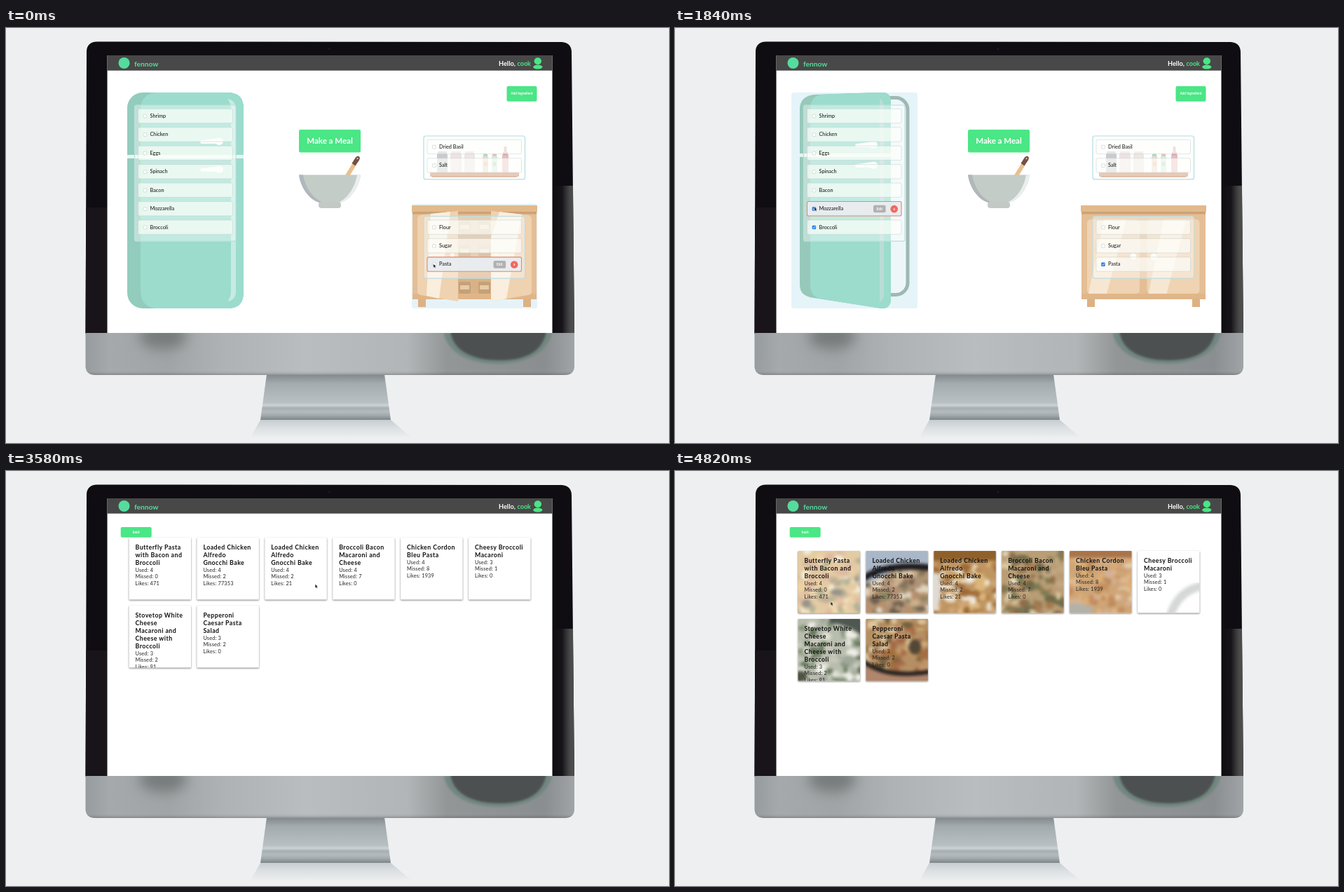
An HTML page that plays this animation: 946x592 px, repeating every 4.84 s.

```html
<!DOCTYPE html>
<html lang="en">
<head>
<meta charset="utf-8">
<title>Kitchen planner</title>
<style>
html, body { margin: 0; width: 100%; height: 100%; overflow: hidden; background: #edeff1; }
svg { display: block; width: 946px; height: 592px; font-family: Lato, "Open Sans", sans-serif; }
filter { color-interpolation-filters: sRGB; }
.mix { isolation: isolate; }
.mix > g { mix-blend-mode: plus-lighter; }
</style>
</head>
<body>
<svg id="stage" viewBox="0 0 946 592" xmlns="http://www.w3.org/2000/svg"></svg>
<script>
const LOOP = 4840;
const GREEN = '#4be685';

// Markup helpers
const attrs = o => Object.entries(o).map(([k, v]) => ` ${k}="${v}"`).join('');
const box = (x, y, w, h, fill, r = 0, o = {}) =>
  `<rect x="${x}" y="${y}" width="${w}" height="${h}" fill="${fill}" rx="${r}"${attrs(o)}/>`;
const path = (d, fill, o = {}) => `<path d="${d}" fill="${fill}"${attrs(o)}/>`;
const dot = (x, y, rx, fill, ry = rx, o = {}) =>
  `<ellipse cx="${x}" cy="${y}" rx="${rx}" ry="${ry}" fill="${fill}"${attrs(o)}/>`;
const text = (x, y, s, size, fill = '#222', o = {}) =>
  `<text x="${x}" y="${y}" font-size="${size}" fill="${fill}"${attrs(o)}>${s}</text>`;
const group = (id, inner, o = {}) => `<g id="${id}"${attrs(o)}>${inner}</g>`;
const grad = (id, stops, down) =>
  `<linearGradient id="${id}" x2="${down ? 0 : 1}" y2="${down ? 1 : 0}">` +
  stops.map(([at, c, a = 1]) => `<stop offset="${at}" stop-color="${c}" stop-opacity="${a}"/>`).join('') +
  '</linearGradient>';
const bold = { 'font-weight': 700 };
const mid = { 'text-anchor': 'middle' };

function seeded(seed) {
  return () => (seed = (seed * 16807) % 2147483647) / 2147483647;
}

const defs = '<defs>' +
  grad('chin', [[0, '#969b9d'], [.05, '#a5a9ab'], [.17, '#a0a4a6'], [.28, '#aeb2b4'], [.45, '#b9bdbf'],
    [.66, '#b1b5b7'], [.74, '#929697'], [.94, '#8a8e90'], [1, '#a0a4a6']]) +
  grad('chinShade', [[0, '#fff', 0], [.85, '#fff', 0], [.95, '#555', .1], [1, '#444', .35]], true) +
  grad('neck', [[0, '#80888b'], [.2, '#a3abae'], [.62, '#b8c0c3'], [.68, '#cdd3d5'], [.74, '#a7aeb1'],
    [.82, '#b4bbbe'], [.9, '#a3aaad'], [1, '#7d8588']], true) +
  grad('foot', [[0, '#c6cdd0'], [.5, '#dde1e3'], [1, '#eceeef']], true) +
  grad('sheen', [[0, '#555', 0], [.45, '#555', .1], [.8, '#4f4f4f', .9], [1, '#505050', 1]]) +
  '<filter id="soft"><feGaussianBlur stdDeviation="2"/></filter>' +
  '<filter id="edge"><feGaussianBlur stdDeviation="1.6"/></filter>' +
  '<filter id="haze" x="-50%" y="-50%" width="200%" height="200%"><feGaussianBlur stdDeviation="9"/></filter>' +
  '<filter id="drop" x="-10%" y="-10%" width="120%" height="125%">' +
  '<feDropShadow dx="0" dy="1" stdDeviation=".9" flood-opacity=".5"/></filter>' +
  '<clipPath id="chinClip"><path d="M113.5 435H811V482Q811 495 797 495H128Q113.5 495 113.5 482Z"/></clipPath>' +
  '<clipPath id="cardClip"><rect width="88.5" height="88.5" rx="1"/></clipPath>' +
  '</defs>';

function monitor() {
  return path('M349 584L363 559H549L578 584Z', 'url(#foot)') +
    path('M372 494H540L549 559H363Z', 'url(#neck)') +
    path('M115 34Q115 20 130 19.5L793 20Q806.5 21 807 34L811 436H113.5Z', '#0f0d12') +
    path('M114.3 256H145V436H113.5Z', '#191419') +
    path('M779 225H809L811 436H779Z', 'url(#sheen)') +
    dot(461, 30, 1.4, '#1c1b22') +
    `<g clip-path="url(#chinClip)">${box(113, 435, 698, 60, 'url(#chin)')}` +
    dot(224, 440, 34, '#767b7c', 18, { filter: 'url(#haze)' }) +
    path('M625 435C630 464 662 479 702 479S772 464 779 435Z', '#71877f', { filter: 'url(#edge)' }) +
    path('M634 432C638 462 667 474 704 474S766 462 771 432Z', '#4d5051', { filter: 'url(#edge)' }) +
    box(113, 435, 698, 60, 'url(#chinShade)') + '</g>' +
    box(144.5, 39, 635, 396, '#fff');
}

function header() {
  return box(144.5, 39, 635, 21.7, '#484848') +
    dot(168.5, 50, 8, '#55dc9c') +
    text(183, 54.7, 'fennow', 10.2, '#55dc9c', bold) +
    text(703, 54.4, 'Hello,', 9.2, '#fff', bold) +
    text(729.5, 54.4, 'cook', 9, GREEN, bold) +
    dot(758.8, 47.3, 5.2, GREEN, 5) + dot(758.8, 55.6, 6.6, GREEN, 3);
}

const handle = (x, y, w) =>
  path(`M${x} ${y + 5}Q${x} ${y + 3} ${x + 4} ${y + 3}L${x + w - 6} ${y}Q${x + w} ${y} ${x + w} ${y + 4}` +
    `Q${x + w} ${y + 10} ${x + w - 7} ${y + 10}L${x + w - 11} ${y + 8}H${x + 3}Q${x} ${y + 8} ${x} ${y + 5}Z`, '#fafdfc');

function fridgeShut() {
  return box(173, 92, 166, 308, '#92ccbc', 22) +
    path('M213 92H317Q339 92 339 114V378Q339 400 317 400H213Q192 397 192 375V117Q192 95 213 92Z', '#9bdccd') +
    path('M316 101Q328 103 328 116V376Q328 388 316 390Q321 384 321 374V116Q321 107 316 101Z', '#c6ebe2') +
    box(173, 181, 166, 5, '#e6f7f2') + handle(277, 157, 33) + handle(277, 197, 33);
}

function fridgeOpen() {
  return box(166, 92, 180, 308, '#e5f4f9', 4) +
    box(290, 99.5, 42, 281, '#edf7fa', 17, { stroke: '#9fb9b2', 'stroke-width': 5 }) +
    path('M199 95L288 92H298Q308 93 308 106V386Q308 399 297 400Q292 400 288 399L198 385Q178 383 178 366V116Q178 97 199 95Z', '#96c9ba') +
    path('M207 95L288 92H298Q308 93 308 106V386Q308 399 297 400Q292 400 288 399L206 386Q193 382 193 366V116Q193 99 207 95Z', '#9bdccd') +
    path('M292 101Q298 104 298 114V380Q298 388 292 391Z', '#b9dcd6') +
    path('M178 179H308V184H178Z', '#e3f5f1') + handle(257, 162, 32) + handle(257, 191, 32);
}

const cupboard = inner =>
  box(588, 386, 11, 12, '#dcb183') + box(738, 386, 11, 12, '#dcb183') +
  box(580, 260, 177, 127, '#e4be95', 2) + inner +
  box(580, 379, 177, 8, '#e0b688') + box(579, 253, 179, 9.5, '#e2b98b', 1) +
  box(580, 262, 177, 3.5, '#cda276');

function cabinetShut() {
  const door = (x, knob) => box(x, 273, 75, 106, '#efd3b2', 5) +
    path(`M${x + 24} 273H${x + 56}L${x + 28} 379H${x + 2}Z`, '#f7e7d2') + dot(knob, 326, 4.5, '#fffaf2');
  return cupboard(door(588, 654) + door(673.5, 683));
}

function cabinetOpen() {
  let jars = '';
  for (const x of [646, 674]) {
    for (const y of [276, 310, 362]) jars += box(x, y, 17, 17, '#c6a077', 2) + box(x + 2, y + 5, 13, 6, '#e7cba8');
  }
  return box(579, 251, 179, 149, '#e5f3f8', 3) +
    cupboard(box(588, 268, 161, 111, '#d8b187', 4) + jars + box(588, 326, 161, 4, '#e4bd92')) +
    path('M587 272Q587 268 591 267L645 261V390L592 381Q587 380 587 376Z', '#efd2b0') +
    path('M606 265L634 262L618 386L600 382Z', '#faeede') +
    path('M692 261L745 267Q750 268 750 272V376Q750 380 745 381L692 390Z', '#efd2b0') +
    path('M704 262L736 266L714 386L692 390V300Z', '#faeede') +
    dot(637, 324, 3, '#fff7ec') + dot(699, 324, 3, '#fff7ec');
}

function spiceShelf() {
  const jar = (x, w, top, c, cap) => box(x, top, w, 206 - top, c, 1.5) + box(x + 1, top - 3, w - 2, 4, cap, 1);
  return box(605, 206, 127, 6, '#d9a888') + box(608, 211.5, 121, 1.5, '#c59070') +
    jar(615, 15, 179, '#a7abae', '#8a8d90') + jar(634, 16, 179, '#e6cfd0', '#b9b4b6') +
    jar(654, 15, 179, '#e5d5d2', '#c9b5b2') + jar(680, 8, 182, '#dfc3ae', '#7cc4a0') +
    jar(693, 8, 182, '#bfe0c6', '#da9c8f') + jar(708, 9, 180, '#d98f92', '#a5565f') + box(710.5, 169, 4, 10, '#b7737a', 1) +
    box(682, 191, 5, 6, '#e78a62') + box(694.5, 191, 5, 6, '#7bbd8d');
}

function bowl() {
  return path('M484 210L495 192L500 195L489 213Z', '#e9bf8d') +
    path('M493.5 193L499 184.5Q502 181.5 504.5 184Q505.5 186 504 188.5L498.5 196.5Z', '#735143') +
    dot(501.5, 186.3, 1, '#e8dcd4') +
    path('M418 209.5H506C504 226 492 245 477 249H447C432 245 420 226 418 209.5Z', '#c4ccc7') +
    path('M418 209.5H424C427 227 438 245 454 249H447C432 245 420 226 418 209.5Z', '#b1b7bb') +
    path('M506 209.5H501C498 227 488 243 474 249H477C492 245 504 226 506 209.5Z', '#ebeeef') +
    box(446, 248, 32, 9, '#c3c9c6', 4);
}

// Ingredient lists: id, x, width, first row centre, names
const lists = [
  ['f', 188.5, 134.5, 125.5, ['Shrimp', 'Chicken', 'Eggs', 'Spinach', 'Bacon', 'Mozzarella', 'Broccoli']],
  ['s', 601, 134.5, 169.5, ['Dried Basil', 'Salt']],
  ['c', 601, 134.5, 284.2, ['Flour', 'Sugar', 'Pasta']]
];
const PITCH = 26.45;
const rows = [];

function list([id, x, w, first, names]) {
  const h = names.length * PITCH + 9;
  return box(x - 5, first - 15.5, w + 10, h, 'rgba(255,255,255,.38)', 3,
    { stroke: id === 's' ? '#b3dde0' : '#bfdde0', 'stroke-width': 1.2 }) +
    names.map((name, i) => {
      const y = first + i * PITCH, key = id + i;
      rows.push({ key, x, w, y });
      return box(x, y - 10.2, w, 20.4, 'rgba(253,255,250,.66)', 2, { stroke: 'rgba(190,205,205,.55)', 'stroke-width': .9 }) +
        group('hot-' + key,
          box(x, y - 10.2, w, 20.4, 'rgba(233,236,239,.93)', 2, { stroke: '#e28a70', 'stroke-width': 1.1 }) +
          box(x + 94.5, y - 5, 17.6, 10.6, '#b1b1b1', 2) +
          text(x + 103.3, y + 2, 'Edit', 4.8, '#fff', { ...mid, ...bold }) +
          dot(x + 124.2, y + .4, 5.3, '#f1695d') +
          text(x + 124.2, y + 2, 'x', 4.8, '#fff', { ...mid, ...bold })) +
        box(x + 7.5, y - 2.2, 4.8, 4.8, '#fff', .8, { stroke: '#c3c9c9', 'stroke-width': .6 }) +
        group('tick-' + key, box(x + 7.2, y - 2.5, 5.4, 5.4, '#2f7ff0', 1) +
          path(`M${x + 8.4} ${y + .3}l1.2 1.2l2-2.8`, 'none', { stroke: '#fff', 'stroke-width': .8 })) +
        text(x + 17, y + 2.3, name, 7.3, '#222', { 'font-weight': 500 });
    }).join('');
}

const button = (x, y, w, h, label, size) =>
  box(x, y, w, h, GREEN, 2) + text(x + w / 2, y + h / 2 + size * .35, label, size, '#fff', { ...mid, ...bold });

function home() {
  return group('fridge', group('fridge-shut', fridgeShut()) + group('fridge-open', fridgeOpen()), { class: 'mix' }) +
    group('cabinet', group('cabinet-shut', cabinetShut()) + group('cabinet-open', cabinetOpen()), { class: 'mix' }) +
    spiceShelf() + lists.map(list).join('') + bowl() +
    button(418, 145, 88, 32.5, 'Make a Meal', 11.5) +
    button(714.5, 83, 43, 21.7, 'Add Ingredient', 4.7);
}

// Recipe cards: title lines, used, missed, likes, load time, photo tones
const meals = [
  ['Butterfly Pasta|with Bacon and|Broccoli', 4, 0, 471, 3660, '#c99a50 #e0b564 #ecd9ac #8a6632 #6d6a35 #c07a45 #d9a94f'],
  ['Loaded Chicken|Alfredo|Gnocchi Bake', 4, 2, 77353, 3680, '#b09376 #cdb08d #e0d3bd #86705c #8b8560 #b98f6c #6f5f4e'],
  ['Loaded Chicken|Alfredo|Gnocchi Bake', 4, 2, 21, 4000, '#bf9561 #dcb67a #ebe0cd #9d6a35 #cfa675 #eee6da #b5834a'],
  ['Broccoli Bacon|Macaroni and|Cheese', 4, 7, 0, 3720, '#b89d75 #dcc9a0 #6f6a48 #a67a50 #e6dabd #7c7a52 #c3a682 #8f6c4a'],
  ['Chicken Cordon|Bleu Pasta', 4, 8, 1939, 4200, '#cfa577 #deb98c #d5b296 #b88a5a #e3cfb2 #c58d5e #dcae74'],
  ['Cheesy Broccoli|Macaroni', 3, 1, 0, 4700, ''],
  ['Stovetop White|Cheese|Macaroni and|Cheese with|Broccoli', 3, 2, 91, 3700, '#b9bdae #dfe1d5 #87967c #a0a89b #eeeee6 #66785c #c9cabd'],
  ['Pepperoni|Caesar Pasta|Salad', 3, 2, 0, 3760, '#b58f63 #cfab78 #a0713f #75603f #ddc59c #a56a47 #c2966a']
];

// Marks that set single photos apart
const accents = {
  0: dot(55, 59, 9, '#38301f', 5) + dot(12, 75, 7, '#38301f', 6) + dot(84, 40, 4, '#4b4026', 5),
  1: path('M-4 -4H93V20Q60 14 38 29Q18 40 -4 48Z', '#a9b7c8') +
    path('M-4 40Q26 17 93 24', 'none', { stroke: '#1d1b1e', 'stroke-width': 9 }),
  2: box(-4, -4, 97, 18, '#8f602c') + dot(2, 56, 8, '#dfdbd3', 26),
  4: box(-4, -4, 97, 14, '#a9744a') + dot(6, 84, 28, '#b3b1a9', 9),
  6: path('M45 -4H93V26Q72 7 45 6Z', '#4f5751') + dot(3, 82, 10, '#4e5543', 8),
  7: dot(70, 40, 9, '#544735', 11) + path('M-4 64Q30 86 92 74V93H-4Z', '#b0866c') +
    path('M-4 60Q30 86 92 75', 'none', { stroke: '#201c1b', 'stroke-width': 6 })
};

function photo(i, tones) {
  if (!tones) {
    return path('M94 50Q58 55 46 94', 'none', { stroke: '#d5d8d7', 'stroke-width': 12, filter: 'url(#soft)' });
  }
  const rnd = seeded(211 + i * 977), c = tones.split(' ');
  let s = box(-8, -8, 105, 105, c[0]);
  for (let n = 0; n < 110; n++) {
    s += dot((rnd() * 92).toFixed(1), (rnd() * 92).toFixed(1), (3 + rnd() * 6).toFixed(1),
      c[Math.floor(rnd() * c.length)], (3 + rnd() * 4).toFixed(1));
  }
  return `<g filter="url(#soft)">${s}${accents[i] || ''}</g>`;
}

const cardAt = i => [175.5 + (i % 6) * 96.9, 95 + Math.floor(i / 6) * 97];

function card([title, used, missed, likes, , tones], i) {
  const [x, y] = cardAt(i), lines = title.split('|');
  const facts = [`Used: ${used}`, `Missed: ${missed}`, `Likes: ${likes}`];
  const below = 16 + lines.length * 11;
  return `<g transform="translate(${x} ${y})">` + box(0, 0, 88.5, 88.5, '#fff', 1, { filter: 'url(#drop)' }) +
    '<g clip-path="url(#cardClip)">' + group('photo-' + i, photo(i, tones)) +
    group('veil-' + i, box(0, 0, 88.5, 88.5, '#fff', 0, { 'fill-opacity': .48 })) +
    lines.map((s, n) => text(9, 16.8 + n * 11, s, 8.8, '#111', { ...bold, 'letter-spacing': .45 })).join('') +
    facts.map((s, n) => text(9, below + n * 9.3, s, 7.3, '#222', { 'letter-spacing': .2 })).join('') +
    '</g></g>';
}

const results = () => group('cards', meals.map(card).join('')) + button(163.7, 80, 44, 14.8, 'back', 4.8);

const stage = document.getElementById('stage');
stage.innerHTML = defs + box(0, 0, 946, 592, '#edeff1') + monitor() + header() +
  group('home', home()) + group('results', results()) +
  group('cursor', path('M0 0L.2 5.2L1.4 4.2L2.3 6L3.3 5.5L2.5 3.8L4 3.6Z', '#111', { stroke: '#fff', 'stroke-width': .4 }));

const el = {};
stage.querySelectorAll('[id]').forEach(n => el[n.id] = n);

// Pointer stops: time, x, y
const stops = [[0, 609.7, 336.5], [300, 609.7, 336.5], [760, 197.3, 285.5], [1350, 197.3, 285.5],
  [1650, 198.8, 255.5], [2000, 198.8, 255.5], [2250, 198.8, 230], [2850, 198.8, 230], [3350, 441, 161.5],
  [4100, 441, 161.5], [4560, 222, 186.5], [LOOP, 222, 186.5]];
const ticks = { c2: 180, f6: 1120, f5: 1760, f4: 2400 };
const FADE = 220, PAGE = 3460, SETTLE = 3640;

const clamp = v => Math.max(0, Math.min(1, v));
const show = (node, on) => node.setAttribute('visibility', on ? 'inherit' : 'hidden');

function pointer(t) {
  const i = Math.max(1, stops.findIndex(s => s[0] > t));
  const [t0, x0, y0] = stops[i - 1], [t1, x1, y1] = stops[i];
  const p = clamp((t - t0) / (t1 - t0)), e = p * p * (3 - 2 * p);
  return [x0 + (x1 - x0) * e, y0 + (y1 - y0) * e];
}

function blend(name, open) {
  el[name + '-open'].setAttribute('opacity', open);
  el[name + '-shut'].setAttribute('opacity', 1 - open);
}

function render(t) {
  const [x, y] = pointer(t), drop = t < SETTLE ? 0 : 19;
  el.cursor.setAttribute('transform', `translate(${x} ${y})`);
  show(el.home, t < PAGE);
  show(el.results, t >= PAGE);
  blend('cabinet', 1 - clamp((t - 376) / FADE));
  blend('fridge', clamp((t - 574) / FADE) - clamp((t - 3120) / FADE));
  for (const r of rows) {
    show(el['hot-' + r.key], x > r.x && x < r.x + r.w && Math.abs(y - r.y) < 10.2);
    show(el['tick-' + r.key], t >= ticks[r.key]);
  }
  el.cards.setAttribute('transform', `translate(0 ${drop})`);
  meals.forEach((m, i) => {
    const [cx, cy] = cardAt(i);
    const over = x > cx && x < cx + 88.5 && y > cy + drop && y < cy + drop + 88.5;
    show(el['photo-' + i], t >= m[4]);
    show(el['veil-' + i], over && t >= m[4]);
  });
}

const start = performance.now();
function tick() {
  render((performance.now() - start) % LOOP);
  requestAnimationFrame(tick);
}
render(0);
requestAnimationFrame(tick);
</script>
</body>
</html>
```
